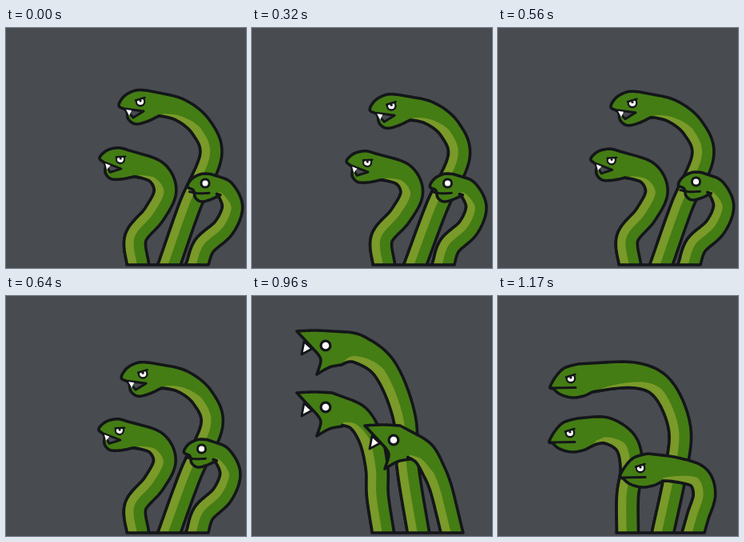
Write an HTML page with a canvas that moves like this. It is 300x300 px and loops after 1.25 s.

```html
<!DOCTYPE html>
<html lang="en">
<head>
<meta charset="utf-8">
<title>Three-headed snake</title>
<style>
html, body { margin: 0; width: 100%; height: 100%; overflow: hidden; background: #484b50; }
canvas { display: block; width: 100vw; height: 100vh; }
</style>
</head>
<body>
<canvas id="stage"></canvas>
<script>
const LOOP = 1250, SWAY = 480, FLOOR = 296;
const INK = '#141619', GREEN = '#447d14', BELLY = '#7a9a29', WHITE = '#fff', BACK = '#484b50';
const LINE = 3.6, WIDTH = 27, BAND = 0.45, STEPS = 12;

// Head outlines around the eye, from throat to crown; a new list starts at each sharp corner.
const round = [[[23, 18], [8, 25], [-6, 28], [-15, 22], [-18, 11], [-27, 5], [-20, -7], [-6, -14], [8, -14]]];
const heads = {
  snarl: round,
  calm: round,
  bite: [[[20, 24], [5, 27], [-11, 36]], [[-11, 36], [-6, 19], [-10, 10]], [[-36, -18], [-14, -19], [8, -18]]],
  shut: [[[27, 17], [16, 22], [2, 24], [-13, 20], [-22, 13], [-26, 11], [-19, -2], [-8, -13], [9, -18]]]
};

// Each pose: the eye, then the middle of the body from neck to foot. Sway: [amplitude, lag].
const snakes = [
  {
    rest: 'snarl', tilt: 0, size: 1, swayX: [3.6, 0.52], swayY: [3.5, 0],
    idle: [[168, 92], [217, 102], [244, 124], [256, 160], [230, 222], [204, 296]],
    bite: [[92, 62], [132, 66], [166, 91], [190, 150], [195, 216], [208, 296]],
    shut: [[91, 103], [170, 99], [206, 116], [227, 165], [222, 220], [206, 296]]
  },
  {
    rest: 'snarl', tilt: 0.24, size: 0.95, swayX: [1.3, Math.PI / 2], swayY: [2.7, 0],
    idle: [[143, 164], [188, 180], [199, 204], [185, 233], [162, 262], [165, 296]],
    bite: [[92, 139], [132, 152], [148, 178], [156, 215], [157, 250], [164, 296]],
    shut: [[90, 171], [135, 168], [160, 184], [167, 215], [162, 250], [162, 296]]
  },
  {
    rest: 'calm', tilt: 0, size: 0.82, swayX: [-3, 0], swayY: [-2, -1.05],
    idle: [[249, 194], [274, 202], [283, 224], [272, 250], [248, 272], [239, 296]],
    bite: [[177, 180], [214, 196], [228, 220], [236, 240], [243, 267], [250, 296]],
    shut: [[178, 215], [222, 217], [250, 226], [258, 248], [250, 275], [244, 296]]
  }
];

const strike = [
  { t: 880, from: 'idle', to: 'bite', k: 0.5, face: 'bite', push: [0, 0] },
  { t: 960, from: 'bite', to: 'bite', k: 0, face: 'bite', push: [0, 0] },
  { t: 1040, from: 'bite', to: 'shut', k: 0.5, face: 'bite', push: [-34, 14] },
  { t: 1090, from: 'shut', to: 'shut', k: 0, face: 'shut', push: [-41, 8] },
  { t: 1170, from: 'shut', to: 'shut', k: 0, face: 'shut', push: [0, 0] }
];

const canvas = document.getElementById('stage');
const ctx = canvas.getContext('2d');
const lerp = (a, b, k) => a.map((v, i) => v + (b[i] - v) * k);

// Catmull-Rom curve through the given points.
function spline(points) {
  const out = [points[0]];
  for (let i = 0; i < points.length - 1; i++) {
    const b = points[i], c = points[i + 1];
    const a = points[i - 1] || b, d = points[i + 2] || c;
    for (let n = 1; n <= STEPS; n++) {
      const t = n / STEPS;
      out.push(b.map((v, j) => v + t / 2 * (c[j] - a[j]
        + t * (2 * a[j] - 5 * v + 4 * c[j] - d[j] + t * (3 * v - a[j] - 3 * c[j] + d[j])))));
    }
  }
  return out;
}

function trace(points, fill, line, close) {
  ctx.beginPath();
  points.forEach(p => ctx.lineTo(...p));
  if (close) ctx.closePath();
  if (fill) { ctx.fillStyle = fill; ctx.fill(); }
  if (line) { ctx.lineWidth = line; ctx.stroke(); }
}

function disc(r, fill, y = 0) {
  ctx.beginPath();
  ctx.arc(0, y, r, 0, Math.PI * 2);
  ctx.fillStyle = fill;
  ctx.fill();
}

function drawEye(r, inner) {
  disc(r, INK);
  disc(inner, WHITE);
}

function drawAngryEye() {
  const brow = [[-6, -1.5], [5.5, -5]];
  ctx.save();
  ctx.beginPath();
  [...brow, [9, 9], [-9, 9]].forEach(p => ctx.lineTo(...p));
  ctx.clip();
  drawEye(6.5, 4.1);
  disc(1.6, INK, -1);
  ctx.restore();
  trace(brow, null, 2.6);
}

const faces = {
  calm() {
    drawEye(8, 4.4);
    trace(spline([[-24, 13], [-10, 15.5], [6, 15]]), null, LINE);
  },
  snarl() {
    drawAngryEye();
    trace([[-19, 9], [4, 12], [-9, 20]], BACK, 3, true);
    trace([[-18, 10], [-11, 11], [-14, 17.5]], WHITE);
  },
  bite() {
    drawEye(7.5, 4.3);
    trace([[-27, -5], [-30, 11], [-17, 4]], WHITE, 2.8, true);
  },
  shut() {
    drawAngryEye();
    trace([[-24, 12], [6, 11.5]], null, 3.2);
  }
};

// Outer and inner edges of the body, and the upper rim of the belly band.
function bodyEdges(points, throat, crown) {
  const mid = spline(points), last = mid.length - 1;
  const outer = [crown], inner = [throat], rim = [throat];
  let neck;
  mid.forEach((p, i) => {
    const a = mid[Math.max(0, i - 1)], b = mid[Math.min(last, i + 1)];
    const len = Math.hypot(b[0] - a[0], b[1] - a[1]);
    const n = [(b[1] - a[1]) / len, (a[0] - b[0]) / len];
    if (!i) neck = (crown[0] - throat[0]) * n[0] + (crown[1] - throat[1]) * n[1];
    if (i < STEPS / 2) return;
    const u = Math.min(1, i / (STEPS * 5));
    const w = WIDTH + (neck - WIDTH) * (1 - u) ** 3;
    const at = d => [p[0] + n[0] * d, p[1] + n[1] * d];
    outer.push(at(w / 2));
    inner.push(at(-w / 2));
    rim.push(at(w * (BAND * Math.min(1, u * 2.5) - 0.5)));
  });
  return { outer, inner, rim };
}

function drawSnake(s, step) {
  const face = step.face || s.rest;
  const [tilt, size] = step.face ? [0, 1] : [s.tilt, s.size];
  const wave = ([amp, lag]) => amp * (Math.cos(lag) - Math.cos(step.phase - lag));
  const push = step.push || [wave(s.swayX), wave(s.swayY)];

  // The push fades out from the head down to the fixed foot.
  const keys = s[step.from].map((p, i) =>
    lerp(p, s[step.to][i], step.k).map((v, j) => v + push[j] * (1 - i / 5)));
  const eye = keys[0];
  const cos = Math.cos(tilt) * size, sin = Math.sin(tilt) * size;
  const place = ([x, y]) => [eye[0] + x * cos - y * sin, eye[1] + x * sin + y * cos];
  const head = heads[face].flatMap(spline).map(place);
  const throat = head[0], crown = head[head.length - 1];

  const foot = keys[5];
  const below = lerp(foot, keys[4], -0.4);
  const { outer, inner, rim } = bodyEdges([lerp(throat, crown, 0.5), ...keys.slice(1), below], throat, crown);
  const up = inner.slice().reverse();

  ctx.save();
  ctx.beginPath();
  ctx.rect(0, 0, 300, FLOOR);
  ctx.clip();
  trace([...head, ...outer, ...up], GREEN, LINE, true);
  trace([...rim, ...up], BELLY);
  trace(inner, null, LINE);
  ctx.translate(...eye);
  ctx.rotate(tilt);
  ctx.scale(size, size);
  faces[face]();
  ctx.restore();
  return foot[0];
}

function stepAt(t) {
  if (t >= strike[0].t) return strike.filter(s => s.t <= t).pop();
  const phase = Math.floor(t / 80) * 80 / SWAY * Math.PI * 2;
  return { from: 'idle', to: 'idle', k: 0, phase };
}

function draw(t) {
  const w = Math.round(innerWidth * devicePixelRatio), h = Math.round(innerHeight * devicePixelRatio);
  if (canvas.width !== w || canvas.height !== h) { canvas.width = w; canvas.height = h; }
  ctx.setTransform(w / 300, 0, 0, h / 300, 0, 0);
  ctx.fillStyle = BACK;
  ctx.fillRect(0, 0, 300, 300);
  ctx.strokeStyle = INK;
  ctx.lineJoin = ctx.lineCap = 'round';
  const step = stepAt(t);
  const feet = snakes.map(s => drawSnake(s, step));
  trace([[Math.min(...feet) - 14, FLOOR], [Math.max(...feet) + 14, FLOOR]], null, LINE);
}

const begin = performance.now();
function tick() {
  draw((performance.now() - begin) % LOOP);
  requestAnimationFrame(tick);
}
tick();
</script>
</body>
</html>
```
